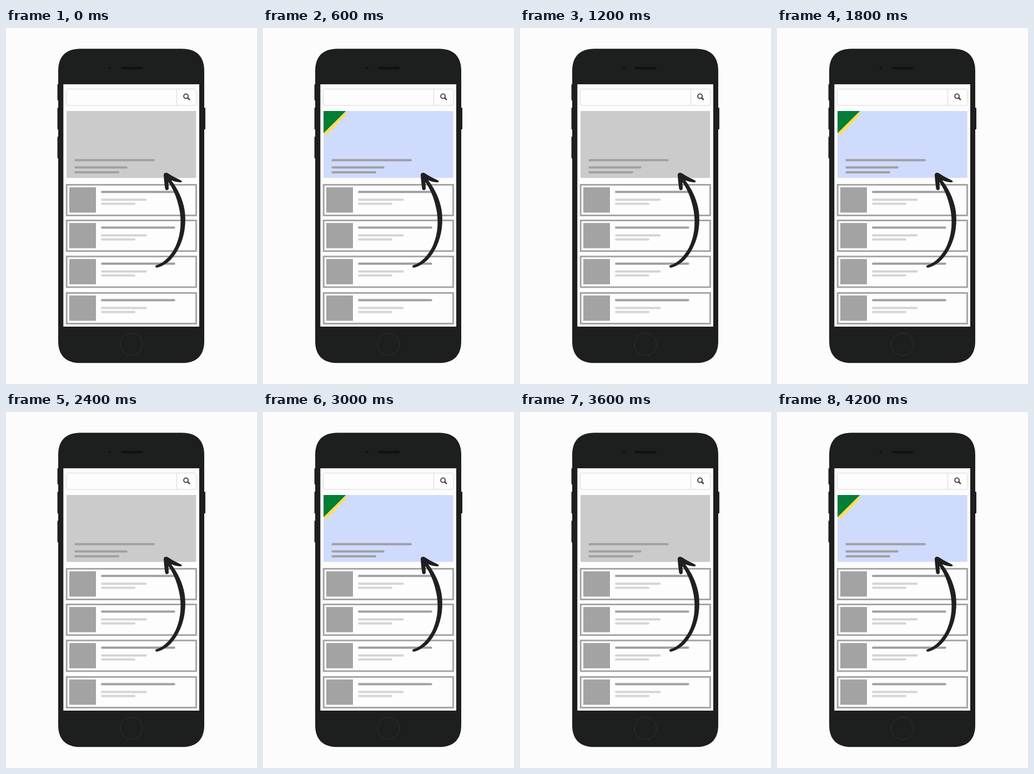
Animation of 452 by 639 pixels, one loop 4.8 s. Source, as an HTML page:

```html
<!DOCTYPE html>
<html lang="en">
<head>
<meta charset="utf-8">
<title>Featured listing</title>
<style>
  html, body { margin: 0; width: 100%; height: 100%; overflow: hidden; background: #fcfcfc; }
  svg { display: block; width: 452px; height: 639px; }
  .body { fill: #1d1f1e; }
  .lines { fill: none; stroke: #a1a1a1; stroke-width: 4; stroke-linecap: round; }
  .lines .pale { stroke: #d5d5d5; }
  .promo { animation: blink 1200ms step-end infinite; }
  @keyframes blink {
    0% { visibility: hidden; }
    50% { visibility: visible; }
  }
</style>
</head>
<body>
<svg viewBox="0 0 452 639">
  <defs>
    <g id="card">
      <rect x="109.2" y="1.4" width="233.3" height="55" fill="none" stroke="#a1a1a1" stroke-width="2.8"/>
      <rect x="114" y="6" width="48" height="45.3" fill="#a3a3a3"/>
      <g class="lines">
        <path d="M173 14.3H302.7"/>
        <path class="pale" d="M173 28.3H251.5M173 35.5H231"/>
      </g>
    </g>
  </defs>

  <g class="body">
    <rect x="92.6" y="101" width="4" height="29" rx="1"/>
    <rect x="92.6" y="143" width="4" height="39" rx="1"/>
    <rect x="92.6" y="195" width="4" height="39" rx="1"/>
    <rect x="354" y="143" width="5" height="39" rx="1"/>
    <path d="M134 37.3H317C343 37.3 357 51 357 77V562C357 588 343 601.3 317 601.3H134C108 601.3 94 588 94 562V77C94 51 108 37.3 134 37.3Z"/>
  </g>
  <circle cx="187" cy="72" r="2.5" fill="#121413"/>
  <rect x="207" y="69.8" width="39" height="4.4" rx="2.2" fill="#101211"/>
  <circle cx="225.8" cy="568" r="20" fill="none" stroke="#303231"/>
  <rect x="103.3" y="101" width="244.7" height="435" fill="#fdfdfd"/>

  <g fill="none" stroke="#d8d8d8">
    <rect x="108.5" y="109.5" width="234.5" height="29.5" rx="3"/>
    <path d="M307.5 109.5V139"/>
  </g>
  <g fill="none" stroke="#414141">
    <circle cx="324.1" cy="122.4" r="4" stroke-width="1.9"/>
    <path d="M327.3 125.6L330.2 128.4" stroke-width="2.6" stroke-linecap="round"/>
  </g>

  <rect x="109" y="149" width="233.3" height="120" fill="#cacbca"/>
  <g class="promo">
    <rect x="109" y="149" width="233.3" height="120" fill="#cfdbfd"/>
    <path d="M145 153H152.3L114 192L109 188Z" fill="#ffdc55"/>
    <path d="M109 149H149.3L109 188.7Z" fill="#007e36"/>
  </g>
  <path class="lines" d="M125.3 237.3H266M125.3 250.3H216.8M125.3 259H202"/>

  <use href="#card" y="280"/>
  <use href="#card" y="344"/>
  <use href="#card" y="408.7"/>
  <use href="#card" y="474.2"/>

  <path fill="#202021" d="M269 428C269 426 271 425.5 273 425C287 420 300 405 307 388C315 369 317 344 311 320C307 302 300 288 292.5 276.5L293 288C293 292 287.5 292 286.5 288.5C285.5 280 284.5 273 284 264C284 260 288 258.5 292 261C300 266.500 308 270 315 273.500C318 275.500 316 277.500 313 277C307 276.500 302 275 297.500 273.500C309 288 318 306 321.500 326C325 348 322 372 313 391C304 411 291 425 273 430C270.500 430.500 269 429.500 269 428Z"/>
</svg>
</body>
</html>
```
